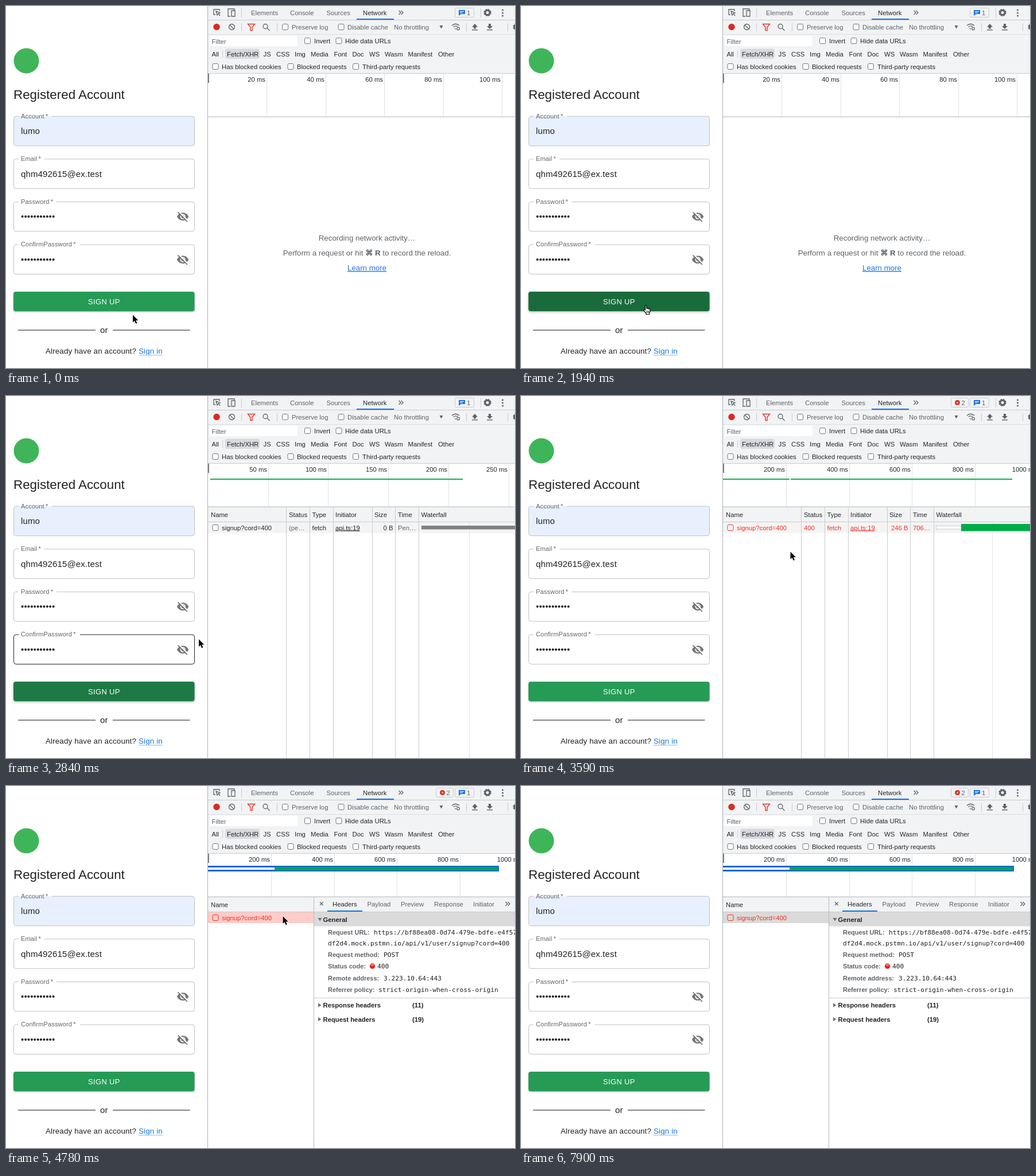
Animation of 887 by 631 pixels, one loop 7920 ms. Source, as an HTML page:

```html
<!DOCTYPE html>
<html lang="en">
<head>
<meta charset="utf-8">
<title>Sign up request</title>
<style>
  html, body { margin: 0; width: 100%; height: 100%; overflow: hidden; background: #fff; }
  svg { display: block; font: 11.3px "Liberation Sans", Arial, sans-serif; fill: #5f6368; }
  text { white-space: pre; }
  .dark { fill: #252629; }
  .black { fill: #222; }
  .bold { font-weight: bold; }
  .key { font-size: 11px; font-weight: bold; }
  .mono { font: 11.2px "DejaVu Sans Mono", monospace; fill: #222; }
  .red { fill: #ee3324; }
  .link { fill: #1a73e8; text-decoration: underline; }
  .line { fill: none; stroke: #5f6368; stroke-width: 1.3; }
  .title { font-size: 22.35px; fill: #222; }
  .label { font-size: 11.1px; letter-spacing: .1px; fill: #666; }
  .value { font-size: 15px; letter-spacing: .14px; fill: #212121; }
  .action { font-size: 12.95px; letter-spacing: .37px; fill: #fff; }
  .note { font-size: 13.3px; text-anchor: middle; }
  .end { text-anchor: end; }
  .foot { font-size: 13.4px; letter-spacing: .13px; fill: #222; }
  .signin { fill: #1976d2; }
</style>
</head>
<body>
<svg id="stage" width="887" height="631" viewBox="0 0 887 631"></svg>
<script>
const LOOP = 7920;
const GRAY = '#c9cbce', PANEL = '#f1f3f4', BLUE = '#1a73e8', GREEN = '#00ac47', RED = '#ee3324';
const ICON = '#5f6368', BORDER = '#c0c0c0';

const text = (x, y, s, cls = '') => `<text x="${x}" y="${y}" class="${cls}">${s}</text>`;
const texts = (y, cls, ...pairs) => pairs.map(([x, s]) => text(x, y, s, cls)).join('');
const rect = (x, y, w, h, fill, more = '') =>
  `<rect x="${x}" y="${y}" width="${w}" height="${h}" fill="${fill}" ${more}/>`;
const vline = (x, y1, y2, color = GRAY) => rect(x, y1, 1, y2 - y1, color);
const path = (d, more = 'class="line"') => `<path d="${d}" ${more}/>`;
const filled = (d, color) => path(d, `fill="${color}"`);
const circle = (x, y, r, more = '') => `<circle cx="${x}" cy="${y}" r="${r}" ${more}/>`;
const group = (id, content) => `<g id="${id}">${content}</g>`;
const checkbox = (x, y, color = '#767676', fill = '#fff') =>
  rect(x - 5, y - 5, 10, 10, fill, `rx="2" stroke="${color}"`);

// Sign-up form
function field(y, label, value, notchEnd, id) {
  const outline = `M${notchEnd} ${y}H324.5a4 4 0 0 1 4 4v43.4a4 4 0 0 1 -4 4H17.5a4 4 0 0 1 -4 -4v-43.4a4 4 0 0 1 4 -4H22`;
  return path(outline, `id="${id}" fill="none" stroke="${BORDER}"`) +
    text(26, y + 3.3, `${label}\u2009*`, 'label') + text(26, y + 30.8, value, 'value');
}
const eyeOff = y => `<g transform="translate(297 ${y}) scale(.925)">` +
  filled('M1 12Q4.5 4.5 12 4.5T23 12Q19.5 19.5 12 19.5T1 12Z', '#757575') +
  circle(12, 12, 5, 'fill="#fff"') + circle(12, 12, 3, 'fill="#757575"') +
  path('M4 2L22 20', 'stroke="#fff" stroke-width="2"') +
  path('M2.6 3.6L20.4 21.4', 'stroke="#757575" stroke-width="1.8"') + '</g>';

const dots = '•'.repeat(11);
const form =
  circle(35.5, 95.5, 22, 'fill="#3fb559"') +
  text(13, 162, 'Registered Account', 'title') +
  rect(13.5, 192.2, 315, 51.4, '#e8f0fe', 'rx="4"') +
  field(192.2, 'Account', 'lumo', 80, 'account') +
  field(266.8, 'Email', 'qhm492615@ex.test', 67, 'email') +
  field(341.4, 'Password', dots, 88, 'password') + eyeOff(356) +
  field(416, 'ConfirmPassword', dots, 129, 'confirm') + eyeOff(431) +
  rect(13, 498, 315.5, 34, '#259b56', 'id="button" rx="4"') +
  '<clipPath id="clip"><rect x="13" y="498" width="315.5" height="34" rx="4"/></clipPath>' +
  `<g clip-path="url(#clip)">${circle(215, 525, 183, 'id="ripple" fill="#fff"')}</g>` +
  text(143, 519.5, 'SIGN UP', 'action') +
  rect(21, 564.3, 135, 1.4, '#555') + rect(186, 564.3, 134.5, 1.4, '#555') +
  text(164, 570, 'or', 'value') +
  text(69, 606, 'Already have an account?', 'foot') +
  text(231, 606, 'Sign in', 'foot signin') + rect(231, 608, 42, 1, '#8ab8e6');

// Developer tools: toolbar and filters
const badge = (x, w, icon, countX, count) =>
  rect(x + .5, 3.5, w, 16, 'none', 'rx="2" stroke="#c8ccd1"') + icon + text(countX, 15.5, count);
const transferIcon = (x, arrow) => filled(arrow, ICON) + rect(x - 5, 41, 10, 1.4, ICON);
const gear = (x, y) => circle(x, y, 4, `fill="none" stroke="${ICON}" stroke-width="3"`) +
  circle(x, y, 5.7, `fill="none" stroke="${ICON}" stroke-width="1.8" stroke-dasharray="2.9 1.58"`);
const chevrons = (x, y) =>
  path(`M${x} ${y}l3.5 3.5l-3.5 3.5m4 -7l3.5 3.5l-3.5 3.5`);

const toolbar =
  rect(352, 0, 535, 117, PANEL) + rect(352, 24, 535, 1, GRAY) + rect(352, 49, 535, 1, '#dcdee1') +
  rect(352, 117, 535, 1, GRAY) +
  path('M365 15H362V6H372V9M366 9L373 12L370 13L368 16ZM370 13L373 17') +
  path('M387 17V5H398V8M386 18H391M393 8H399V18H393Z') +
  vline(410, 4, 20) + vline(410, 30, 44) + vline(472, 30, 44) + vline(802, 30, 44) +
  vline(874, 30, 44) + vline(827, 4, 20) +
  texts(15.6, '', [427, 'Elements'], [495, 'Console'], [558.5, 'Sources']) +
  text(622, 15.6, 'Network', 'dark') + rect(611, 22, 65, 2, BLUE) + chevrons(684.5, 8) +
  badge(782, 33, filled('M789 7H800V14H793L789 17Z', BLUE) +
    path('M791 9.5H798M791 11.7H796', 'stroke="#fff"'), 803, '1') +
  gear(839, 11.5) + [7, 12, 17].map(y => circle(865.5, y, 1.5)).join('') +
  circle(367, 36.5, 5.7, 'fill="#dd2a22"') +
  circle(393.5, 36.5, 5, 'class="line"') + path('M390 33L397 40') +
  path('M421.5 31.5H433.5L429 37V42.5H426V37Z', `fill="none" stroke="${RED}" stroke-width="1.4"`) +
  circle(452, 35.5, 4, 'class="line"') + path('M455 38.5L459.5 43') +
  checkbox(486.5, 36.5) + checkbox(584, 36.5) +
  texts(40.5, '', [498, 'Preserve log'], [595, 'Disable cache'], [676, 'No throttling']) +
  filled('M755.5 34H761.5L758.5 39.5Z', ICON) +
  path('M777 34Q783.5 28.5 790 34M779.5 36.5Q783.5 33.5 787 36M782 39L784 40.5') +
  circle(788, 39.5, 2.3, 'class="line"') +
  transferIcon(817, 'M817 31L822 36.5H819V39.5H815V36.5H812Z') +
  transferIcon(843, 'M843 40L848 35H845V31H841V35H838Z') +
  gear(890, 36.5) +
  rect(355, 52, 153, 18, '#fff') + text(358.5, 65.5, 'Filter') +
  checkbox(525.5, 60.7) + checkbox(580, 60.7) +
  texts(65, 'dark', [537, 'Invert'], [591, 'Hide data URLs']) +
  rect(382, 74.5, 60, 17.5, '#d8dade', 'rx="4"') + vline(377, 77, 90) +
  texts(87.5, 'dark', [358.5, 'All'], [385, 'Fetch/XHR'], [448.5, 'JS'], [471, 'CSS'], [503, 'Img'],
    [531, 'Media'], [571.5, 'Font'], [603.5, 'Doc'], [633, 'WS'], [660, 'Wasm'],
    [700.5, 'Manifest'], [753, 'Other']) +
  checkbox(365, 105.5) + checkbox(496, 105.5) + checkbox(609.5, 105.5) +
  texts(109.7, 'dark', [376, 'Has blocked cookies'], [507, 'Blocked requests'], [621, 'Third-party requests']);

const errors = badge(749, 30,
  circle(760.5, 11.5, 4.5, 'fill="#d93025"') + path('M759 10l3 3M762 10l-3 3', 'stroke="#fff"'), 767.5, '2');

// Network views
const timeline = (step, unit) => [1, 2, 3, 4, 5].map(i => {
  const x = Math.round(352 + step * i);
  return vline(x, 118, 193, '#dfe1e4') + text(x - 2, 132, `${unit * i} ms`, 'dark end');
}).join('');

const header = rect(352, 194, 535, 25, PANEL) + rect(352, 219, 535, 1, GRAY);
const columns = [488, 529, 570, 638, 678, 719];
const table = (guide, [status, size, time], cls, quietCls, boxColor, waterfall) =>
  header + rect(352, 220, 535, 19, '#f4f4f4') + vline(guide, 220, 631, '#e3e3e3') +
  columns.map(x => vline(x, 194, 631)).join('') +
  texts(210.5, 'dark', [357, 'Name'], [493, 'Status'], [533.5, 'Type'], [574, 'Initiator'],
    [642, 'Size'], [683, 'Time'], [723.5, 'Waterfall']) +
  checkbox(365, 229.5, boxColor) +
  texts(233.5, cls, [376, 'signup?cord=400'], [533.5, 'fetch'],
    [574, '<tspan text-decoration="underline">api.ts:19</tspan>']) +
  texts(233.5, quietCls, [493, status], [683, time]) +
  text(674.5, 233.5, size, `${cls} end`) + waterfall;

const idle = timeline(102.4, 20) +
  text(629, 409, 'Recording network activity…', 'note') +
  text(629, 435, 'Perform a request or hit <tspan class="bold">⌘ R</tspan> to record the reload.', 'note') +
  text(629, 461, 'Learn more', 'note link');

const pending = timeline(104.7, 50) + rect(356, 144, 440, 2, '#12b347') +
  table(807, ['(pe…', '0 B', 'Pen…'], 'dark', '', undefined, rect(724, 226, 163, 6.5, '#808080'));

const failed = timeline(109.8, 200) +
  rect(352, 144, 116, 2, '#12b347') + rect(470, 144, 386, 2, '#12b347') +
  table(821, ['400', '246 B', '706…'], 'red', 'red', RED,
    rect(723.5, 226.5, 44, 5.5, '#fff', 'stroke="#ccc"') + rect(767, 223, 120, 12.5, GREEN));

const detail = (y, label, x, value) => text(561, y, label, 'key') + text(x, y, value, 'mono');
const collapsed = (y, label, count) => filled(`M544 ${y - 7.5}v7l5.5 -3.5Z`, '#6e6e6e') +
  texts(y, 'bold black', [552.5, label], [708, count]);

const details = timeline(109.8, 200) +
  rect(352, 139, 507, 10, '#1967d2') + rect(352, 142, 116, 4, '#fff') + rect(468, 141, 389, 6, '#00a650') +
  header + rect(352, 220, 185, 19, '#ffccc9', 'id="row"') +
  text(357, 210.5, 'Name', 'dark') + checkbox(365, 229.5, RED, 'none') +
  text(376, 233.5, 'signup?cord=400', 'red') +
  path('M547 202.5l5.5 5.5M552.5 202.5l-5.5 5.5') +
  text(569, 209.7, 'Headers', 'dark') + rect(560, 217, 61, 2, BLUE) +
  texts(209.7, '', [629.5, 'Payload'], [688, 'Preview'], [746, 'Response'], [814, 'Initiator']) +
  chevrons(870.5, 202) +
  rect(537, 220, 350, 24.5, '#dadada') + filled('M543.5 230H550.5L547 235.5Z', '#6e6e6e') +
  text(552.5, 237, 'General', 'bold dark') +
  detail(259, 'Request URL:', 641, 'https://bf88ea08-0d74-479e-bdfe-e4f57') +
  text(561, 278, 'df2d4.mock.pstmn.io/api/v1/user/signup?cord=400', 'mono') +
  detail(298, 'Request method:', 658, 'POST') +
  detail(318, 'Status code:', 647, '400') + circle(638.5, 314, 4.7, 'fill="#e3221b"') +
  '<ellipse cx="638.5" cy="312" rx="3" ry="1.6" fill="#f58a85"/>' +
  detail(338.5, 'Remote address:', 658, '3.223.10.64:443') +
  detail(358.5, 'Referrer policy:', 649, 'strict-origin-when-cross-origin') +
  rect(537, 369, 350, 1, GRAY) +
  collapsed(386, 'Response headers', '(11)') + collapsed(410.5, 'Request headers', '(19)') +
  vline(536, 194, 631, '#b8b8b8');

const arrow = path('M0 0V13L3 10.2L5.2 15.2L7.4 14.2L5.2 9.4H9.3Z',
  'fill="#000" stroke="#fff" stroke-width="1.6" paint-order="stroke"');
const hand = path('M4 9V2Q4 .5 5.2 .7T6.3 2V6Q8 5.2 8.5 6.5Q10 5.8 10.5 7.2Q12.5 6.7 12.6 8.5V11L11.2 14V16.5H5.5V14.5L1 9.5Q.8 7.3 4 9Z',
  'fill="#fff" stroke="#000" stroke-width="1.2"') + path('M6.5 10V14M8.5 10V14M10.3 10V14', 'stroke="#000" stroke-width=".8"');

const views = [idle, pending, failed, details];
const viewStarts = [0, 2240, 3140, 4780];
const $ = id => document.getElementById(id);

$('stage').innerHTML = rect(0, 0, 887, 631, '#fff') + form + toolbar + group('errors', errors) +
  views.map((view, i) => group(`view${i}`, view)).join('') +
  rect(352, 192.5, 535, 1.5, '#c8cacd') + rect(351.5, 118, 2.5, 16, '#7d7f82') + vline(351, 0, 631, '#adb0b3') +
  group('arrow', arrow) + group('hand', hand);

// Each step: start time, then the values held until the next step
const cursorSteps = [
  [0, 221, 538.5, 'arrow'], [150, 217.5, 545, 'arrow'], [290, 215, 548, 'arrow'],
  [590, 215, 526, 'hand'], [740, 212.5, 521, 'hand'], [2690, 232, 512, 'hand'],
  [2840, 336, 424, 'arrow'], [2990, 398, 362, 'arrow'], [3140, 436, 315, 'arrow'],
  [3290, 457, 288, 'arrow'], [3440, 467, 276, 'arrow'], [3590, 469.5, 271.5, 'arrow'],
  [3890, 471, 264, 'arrow'], [4040, 476, 245, 'arrow'], [4190, 481, 230, 'arrow'],
  [4330, 482.5, 227, 'arrow'], [5220, 505, 256, 'arrow'], [5370, 529, 288, 'arrow'],
  [5670, 580, 325, 'arrow'], [5820, 632, 352, 'arrow'], [5970, 649.5, 356.5, 'arrow'],
  [6860, 819, 553, 'arrow'], [7010, 0, 0, 'none'],
];
const buttonSteps = [[0, '#259b56'], [590, '#20834a'], [740, '#1a6b3c'], [2840, '#1e7a45'], [2990, '#259b56']];
const rippleSteps = [[0, 0], [2090, .12], [2240, .05], [2390, 0]];
const held = (steps, t) => steps.findLast(step => step[0] <= t);

function draw(t) {
  const current = viewStarts.findLastIndex(start => start <= t);
  views.forEach((_, i) => $(`view${i}`).style.display = i === current ? '' : 'none');
  $('errors').style.display = current > 1 ? '' : 'none';

  const [, x, y, kind] = held(cursorSteps, t);
  for (const id of ['arrow', 'hand']) {
    $(id).style.display = id === kind ? '' : 'none';
    $(id).setAttribute('transform', `translate(${x} ${y})`);
  }

  const hovered = t >= 740 && t < 2990;
  $('button').setAttribute('fill', held(buttonSteps, t)[1]);
  $('button').style.filter = `drop-shadow(0 ${hovered ? 1.5 : 1}px ${hovered ? 2 : 1.2}px rgba(0,0,0,.36))`;
  $('ripple').setAttribute('opacity', held(rippleSteps, t)[1]);
  $('confirm').setAttribute('stroke', t >= 2840 && t < 2990 ? '#212121' : BORDER);
  $('row').setAttribute('fill', t >= 7900 ? '#dadada' : '#ffccc9');
}

const begin = performance.now();
function tick() {
  draw((performance.now() - begin) % LOOP);
  requestAnimationFrame(tick);
}
tick();
</script>
</body>
</html>
```
